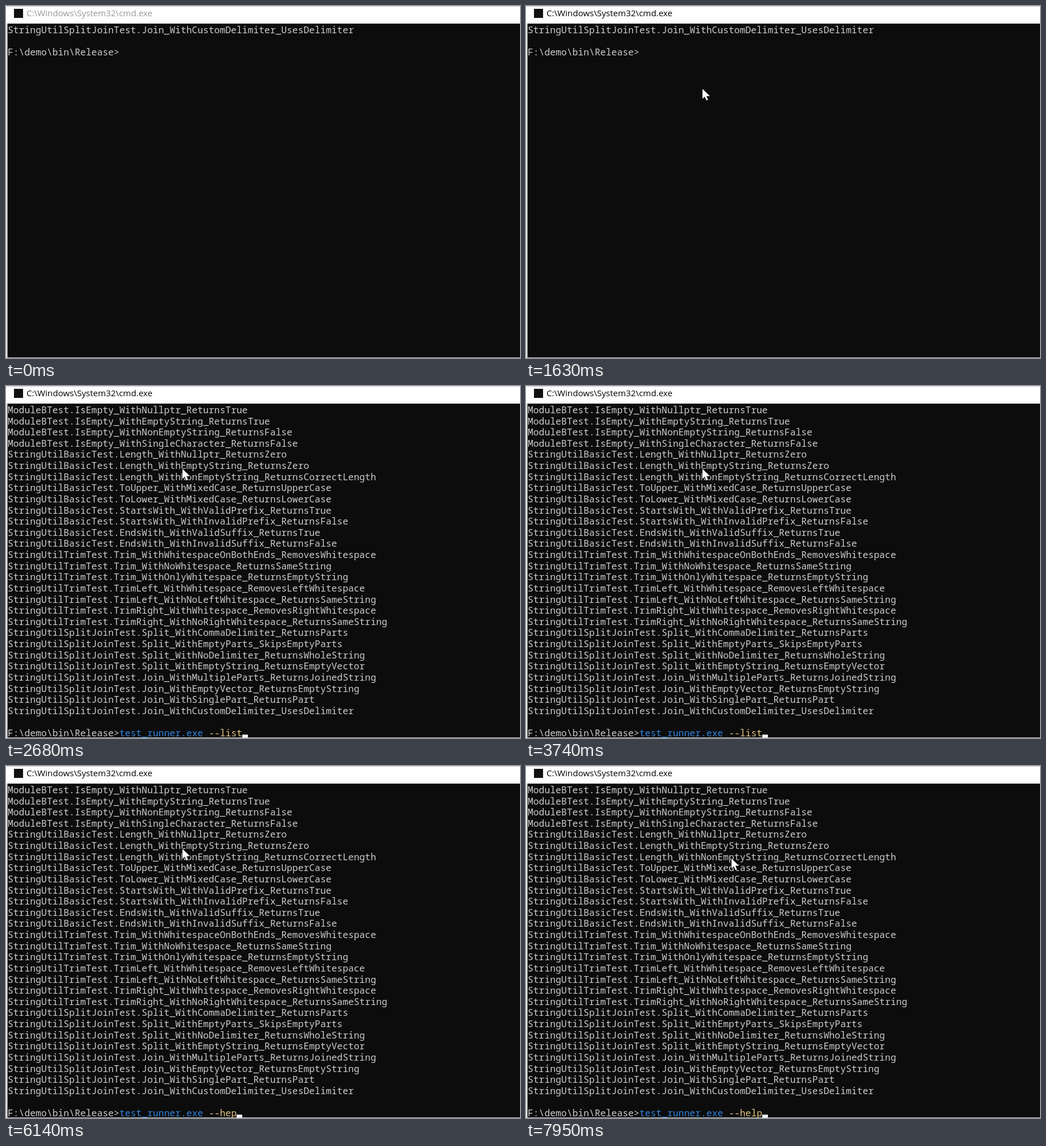
Animation, 903 px wide and 620 px high, one loop 8 s. Source, as an HTML page with a canvas:

```html
<!DOCTYPE html>
<html lang="en">
<head>
<meta charset="utf-8">
<title>Test runner console</title>
<style>
  html, body { margin: 0; width: 100%; height: 100%; overflow: hidden; background: #0c0c0c; }
  canvas { display: block; }
</style>
</head>
<body>
<canvas id="stage" width="903" height="620"></canvas>
<script>
const ctx = document.getElementById('stage').getContext('2d');
const LOOP = 8000, CELL = 9.81, LINE = 19.62, LEFT = 3, TOP = 31;
const ACTIVATED = 570, LISTED = 1760;
const GREY = '#cccccc', BLUE = '#2f86e0', TAN = '#e5c585';
const PROMPT = 'F:\\demo\\bin\\Release>', PROGRAM = 'test_runner.exe ';

const suites = {
  ModuleBTest: `IsEmpty_WithNullptr_ReturnsTrue
    IsEmpty_WithEmptyString_ReturnsTrue
    IsEmpty_WithNonEmptyString_ReturnsFalse
    IsEmpty_WithSingleCharacter_ReturnsFalse`,
  StringUtilBasicTest: `Length_WithNullptr_ReturnsZero
    Length_WithEmptyString_ReturnsZero
    Length_WithNonEmptyString_ReturnsCorrectLength
    ToUpper_WithMixedCase_ReturnsUpperCase
    ToLower_WithMixedCase_ReturnsLowerCase
    StartsWith_WithValidPrefix_ReturnsTrue
    StartsWith_WithInvalidPrefix_ReturnsFalse
    EndsWith_WithValidSuffix_ReturnsTrue
    EndsWith_WithInvalidSuffix_ReturnsFalse`,
  StringUtilTrimTest: `Trim_WithWhitespaceOnBothEnds_RemovesWhitespace
    Trim_WithNoWhitespace_ReturnsSameString
    Trim_WithOnlyWhitespace_ReturnsEmptyString
    TrimLeft_WithWhitespace_RemovesLeftWhitespace
    TrimLeft_WithNoLeftWhitespace_ReturnsSameString
    TrimRight_WithWhitespace_RemovesRightWhitespace
    TrimRight_WithNoRightWhitespace_ReturnsSameString`,
  StringUtilSplitJoinTest: `Split_WithCommaDelimiter_ReturnsParts
    Split_WithEmptyParts_SkipsEmptyParts
    Split_WithNoDelimiter_ReturnsWholeString
    Split_WithEmptyString_ReturnsEmptyVector
    Join_WithMultipleParts_ReturnsJoinedString
    Join_WithEmptyVector_ReturnsEmptyString
    Join_WithSinglePart_ReturnsPart
    Join_WithCustomDelimiter_UsesDelimiter`
};
const tests = Object.entries(suites).flatMap(([suite, names]) =>
  names.split(/\s+/).map(name => `${suite}.${name}`));

// [start time, value]: each value holds until the next start
const typing = [
  [0, ''], [LISTED, '--list'], [4600, '--lis'], [4730, '--li'], [4930, '--l'], [5330, '--'],
  [5880, '--h'], [6010, '--he'], [6140, '--hep'], [6410, '--he'], [6540, '--hel'], [6940, '--help']
];
const caret = [
  [0, 0], [1100, 1], [1630, 0], [LISTED, 1], [2220, 0], [2680, 1], [3210, 0],
  [3740, 1], [4270, 0], [4800, 1], [7420, 0], [7950, 1]
];
const pointerMoves = [
  [700, [310, 146]], [7680, [303, 92]], [7770, [298, 37]], [7860, [332, 108]], [7950, [361, 163]]
];
const valueAt = (steps, t) => steps.findLast(([start]) => start <= t)[1];

function pointerAt(t) {
  if (t >= 700) return valueAt(pointerMoves, t);
  if (t < 70) return null;
  const rest = 1 - Math.floor((t - 70) / 78.75) / 8;
  return [310 + 590 * rest * rest, 146 + 180 * rest * rest];
}

function rect(color, x, y, w, h) {
  ctx.fillStyle = color;
  ctx.fillRect(x, y, w, h);
}

function write(text, row, column = 0, color = GREY) {
  ctx.font = '300 16.35px "Noto Sans Mono", "Liberation Mono", monospace';
  ctx.fillStyle = color;
  ctx.fillText(text, LEFT + column * CELL, TOP + 17 + row * LINE);
}

function drawWindow(active) {
  rect('#0c0c0c', 0, 0, 903, 620);
  rect('#ffffff', 0, 0, 903, TOP);
  rect('#c4c4c4', 0, 0, 903, 1);
  rect('#e4e4e4', 0, TOP, 2, 589);
  rect('#8c8c8c', 2, TOP, 1, 589);
  rect('#d8d8d8', 0, 619, 903, 1);
  rect('#111111', 14, 5, 16, 16);
  ctx.font = '15.1px "Open Sans", "Noto Sans", sans-serif';
  ctx.fillStyle = active ? '#000000' : '#999999';
  ctx.fillText('C:\\Windows\\System32\\cmd.exe', 36, 18);
}

function drawConsole(t) {
  const listed = t >= LISTED;
  const lines = listed ? tests : tests.slice(-1);
  const row = lines.length + 1;
  const option = valueAt(typing, t);
  let column = PROMPT.length;
  lines.forEach((line, i) => write(line, i));
  write(PROMPT, row);
  if (listed) {
    write(PROGRAM, row, column, BLUE);
    column += PROGRAM.length;
    write(option, row, column, TAN);
    column += option.length;
  }
  if (valueAt(caret, t)) {
    rect('#f2f2f2', Math.round(LEFT + column * CELL), Math.floor(TOP + (row + 1) * LINE) - 5, 10, 5);
  }
}

const arrow = new Path2D('M0 0V17.5L4 13.8L7 20.5L9.8 19.3L7 12.8H13.2Z');
function drawPointer([x, y]) {
  ctx.save();
  ctx.translate(x, y);
  ctx.strokeStyle = '#000000';
  ctx.lineWidth = 1.5;
  ctx.stroke(arrow);
  ctx.fillStyle = '#ffffff';
  ctx.fill(arrow);
  ctx.restore();
}

function draw(now) {
  const t = now % LOOP;
  drawWindow(t >= ACTIVATED);
  drawConsole(t);
  const pointer = pointerAt(t);
  if (pointer) drawPointer(pointer);
  requestAnimationFrame(draw);
}
const begin = performance.now();
(function frame() {
  const t = (performance.now() - begin) % LOOP;
  drawWindow(t >= ACTIVATED);
  drawConsole(t);
  const pointer = pointerAt(t);
  if (pointer) drawPointer(pointer);
  requestAnimationFrame(frame);
})();
</script>
</body>
</html>
```
